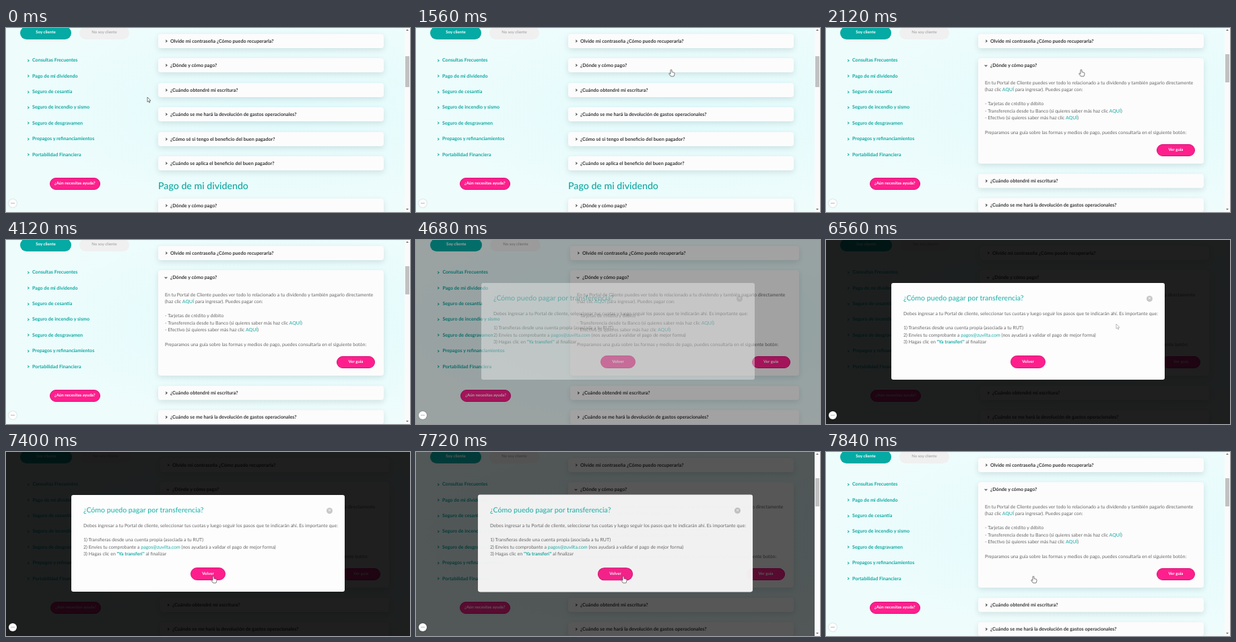
Recreate the animation shown at these times as an HTML page. Size 600 by 274 pixels, loop 7880 ms.

```html
<!DOCTYPE html>
<html lang="es">
<head>
<meta charset="utf-8">
<title>Preguntas frecuentes</title>
<style>
html, body { margin: 0; width: 100%; height: 100%; overflow: hidden; }
body { position: relative; font: 7px/10.57px Lato, sans-serif; color: #666; white-space: nowrap; background: #fff;
  text-rendering: geometricPrecision; }
div, svg { position: absolute; box-sizing: border-box; }
#page { left: 0; top: 0; height: 274px; overflow: hidden;
  background: radial-gradient(ellipse at 70% 45%, #e2fbfc, #effcfc 75%); }
.pill { border-radius: 10px; text-align: center; font-weight: bold; font-size: 6.1px; color: #fff; }
.teal { background: #04aaa3; }
.grey { background: #f0f0f0; color: #999; font-weight: normal; font-size: 6px; }
.pink { background: #ff1f8c; border: .6px solid #d9127a; }
.item { font: bold 7.1px/12px Lato, sans-serif; color: #0ba8a1; padding-left: 7px; }
.card { font: bold 7.15px/21.3px Lato, sans-serif; color: #333; padding-left: 18px; overflow: hidden;
  background: #fcfcfc; border-radius: 4px; box-shadow: 0 3px 8px rgba(0, 40, 50, .12); }
.chev { width: 3px; height: 3px; border: solid; border-width: 1px 1px 0 0; transform: rotate(45deg); }
.item .chev { left: -1px; top: 4.7px; }
.card .chev { left: 10px; top: 9.2px; }
.heading { font: 500 14.2px/20px Lato, sans-serif; color: #0ba8a1; }
.body { left: 10px; top: 31.5px; font: 7px/10.57px Lato, sans-serif; color: #666; }
a, b { color: #16aaa4; }
.card .pink { right: 13px; top: 128px; width: 57px; height: 17.6px; line-height: 16.4px; }
#shade { inset: 0; background: #000; }
#modal { left: 50%; top: 64px; width: 406px; height: 144px; margin-left: -203px; background: #fdfdfd; border-radius: 3px; }
#modal .title { left: 18px; top: 14.7px; font-size: 10.6px; line-height: 16px; color: #16b0a8; }
#modal .text { left: 18px; top: 41px; }
#modal .pink { left: 177px; top: 108px; width: 52px; height: 18.5px; line-height: 17.3px; }
#close { left: 379px; top: 18.5px; width: 9px; height: 9px; border-radius: 50%; background: #c8c8c8;
  color: #fff; font-weight: bold; text-align: center; line-height: 8.6px; }
#bar { left: 592px; top: 0; width: 8px; height: 274px; background: #fafafa; }
#thumb { left: 1px; width: 6px; background: #c1c1c1; }
.arrow { left: 2px; border: 2px solid transparent; }
#chat { left: 4px; top: 255px; width: 12px; height: 12px; border-radius: 50%; background: #fff;
  box-shadow: 0 0 2px rgba(0, 0, 0, .25); }
#chat::after { content: "•••"; position: absolute; left: 0; width: 12px; text-align: center; font-size: 3.5px; line-height: 12px; color: #888; }
#cursor { left: 0; top: 0; overflow: visible; width: 1px; height: 1px; }
#cursor path { fill: #fff; stroke: #444; stroke-width: .7; stroke-linejoin: round; }
</style>
</head>
<body>
<div id="page"></div>
<div id="bar">
  <div class="arrow" style="top:0;border-bottom-color:#666"></div>
  <div id="thumb"></div>
  <div class="arrow" style="top:269px;border-top-color:#666"></div>
</div>
<div id="chat"></div>
<svg id="cursor"><path/></svg>
<script>
const LOOP = 7880, FULL = 600, NARROW = 592;
const ROW = 36.45, TOP = 8.7, CARD = 21.3, GROW = 135.3;
const ARROW = 'M0 0V7.2L1.7 5.7 2.8 8.2 3.9 7.7 2.8 5.2H5Z';
const HAND = 'M-1 .9Q-1 0 0 0T1 .9V3.6L4.2 4.3Q5 4.6 5 5.6 5 8 3.9 10H-.5L-3.2 6.4Q-3.4 5.2-2.2 5.4L-1 6.4Z';
const $ = id => document.getElementById(id);
const page = $('page'), cursor = $('cursor'), pointer = cursor.firstChild;

// Horizontal places are percentages, so the layout widens when the scrollbar goes.
function add(cls, x, y, w, h, html) {
  const el = document.createElement('div');
  el.className = cls;
  el.innerHTML = html;
  Object.assign(el.style, { left: x / NARROW * 100 + '%', top: y + 'px', width: w / NARROW * 100 + '%', height: h + 'px' });
  if (cls.startsWith('pill')) el.style.lineHeight = h - (cls.endsWith('pink') ? 1.2 : 0) + 'px';
  return page.appendChild(el);
}
const chev = '<div class="chev"></div>';

add('pill teal', 21, -2, 76, 18.6, 'Soy cliente');
add('pill grey', 109, -2, 74, 18.6, 'No soy cliente');
['Consultas Frecuentes', 'Pago de mi dividendo', 'Seguro de cesantía', 'Seguro de incendio y sismo',
  'Seguro de desgravamen', 'Prepagos y refinanciamientos', 'Portabilidad Financiera'
].forEach((s, i) => add('item', 32, 42.4 + 23.35 * i, 120, 12, chev + s));
add('pill pink', 65, 223.4, 74.5, 17.8, '¿Aún necesitas ayuda?');

const addCard = (s, y) => add('card', 226, y, 335, CARD, chev + s);
const cards = ['Olvide mi contraseña ¿Cómo puedo recuperarla?', '¿Dónde y cómo pago?', '¿Cuándo obtendré mi escritura?',
  '¿Cuándo se me hará la devolución de gastos operacionales?', '¿Cómo sé si tengo el beneficio del buen pagador?',
  '¿Cuándo se aplica el beneficio del buen pagador?'
].map((s, i) => addCard(s, TOP + ROW * i));
const heading = add('heading', 226, 225.5, 200, 20, 'Pago de mi dividendo');
const lastCard = addCard('¿Dónde y cómo pago?', 254.3);
const below = [...cards.slice(2), heading, lastCard];
const openCard = cards[1];
openCard.innerHTML += `<div class="body">En tu Portal de Cliente puedes ver todo lo relacionado a tu dividendo y también pagarlo directamente<br>
(haz clic <a>AQUÍ</a> para ingresar). Puedes pagar con:<br><br>
- Tarjetas de crédito y débito<br>
- Transferencia desde tu Banco (si quieres saber más haz clic <a>AQUÍ</a>)<br>
- Efectivo (si quieres saber más haz clic <a>AQUÍ</a>)<br><br>
Preparamos una guía sobre las formas y medios de pago, puedes consultarla en el siguiente botón:</div>
<div class="pill pink">Ver guía</div>`;
const openChev = openCard.firstChild;

page.insertAdjacentHTML('beforeend', `<div id="shade"></div><div id="modal">
<div class="title">¿Cómo puedo pagar por transferencia?</div><div id="close">×</div>
<div class="text">Debes ingresar a tu Portal de cliente, seleccionar tus cuotas y luego seguir los pasos que te indicarán ahí. Es importante que:<br><br>
1) Transfieras desde una cuenta propia (asociada a tu RUT)<br>
2) Envíes tu comprobante a <a>pagos@zuvilta.com</a> (nos ayudará a validar el pago de mejor forma)<br>
3) Hagas clic en <b>"Ya transferí"</b> al finalizar</div>
<div class="pill pink">Volver</div></div>`);
const shade = $('shade'), modal = $('modal'), thumb = $('thumb'), bar = $('bar');

const ramp = (t, a, b) => Math.min(1, Math.max(0, (t - a) / (b - a)));
const smooth = p => p * p * (3 - 2 * p);
const path = [[40, 210, 103], [1240, 379, 62], [2440, 379, 62], [3040, 427, 123],
  [6400, 427, 123], [6560, 431, 125], [7400, 308, 185]];

function cursorAt(t) {
  let [, x, y] = path[0];
  for (let i = 1; i < path.length; i++) {
    const [t0, x0, y0] = path[i - 1], [t1, x1, y1] = path[i];
    const p = smooth(ramp(t, t0, t1));
    x += (x1 - x0) * p;
    y += (y1 - y0) * p;
  }
  return [x, y];
}

function isHand(t, x, y) {
  if (t < 1560) return x > 226 && (y - TOP) % ROW < CARD;
  if (t < 4640) return y < 67 || (x > 418 && y > 119);
  return x < 326 && y > 172;
}

function draw(t) {
  const grow = smooth(ramp(t, 1580, 1960));
  openCard.style.height = CARD + GROW * grow + 'px';
  openChev.style.transform = `rotate(${45 + 90 * grow}deg)`;
  below.forEach(el => el.style.transform = `translateY(${GROW * grow}px)`);
  thumb.style.top = 42 - 3.5 * grow + 'px';
  thumb.style.height = 46 - 3.5 * grow + 'px';

  const locked = t >= 4640 && t < 7680;
  page.style.width = (locked ? FULL : NARROW) + 'px';
  bar.style.display = locked ? 'none' : '';
  const enter = ramp(t, 4600, 4800), leave = ramp(t, 7680, 7840);
  shade.style.opacity = .88 * enter * (1 - leave);
  modal.style.opacity = enter * (1 - leave ** 2);
  modal.style.transform = `scale(${1 + .08 * leave ** 2})`;

  const [x, y] = cursorAt(t);
  cursor.style.transform = `translate(${x}px, ${y}px)`;
  cursor.style.opacity = t < 5000 ? 1 - ramp(t, 4000, 4120) : ramp(t, 6480, 6640);
  pointer.setAttribute('d', isHand(t, x, y) ? HAND : ARROW);
}

const start = performance.now();
function tick() {
  draw((performance.now() - start) % LOOP);
  requestAnimationFrame(tick);
}
tick();
</script>
</body>
</html>
```
